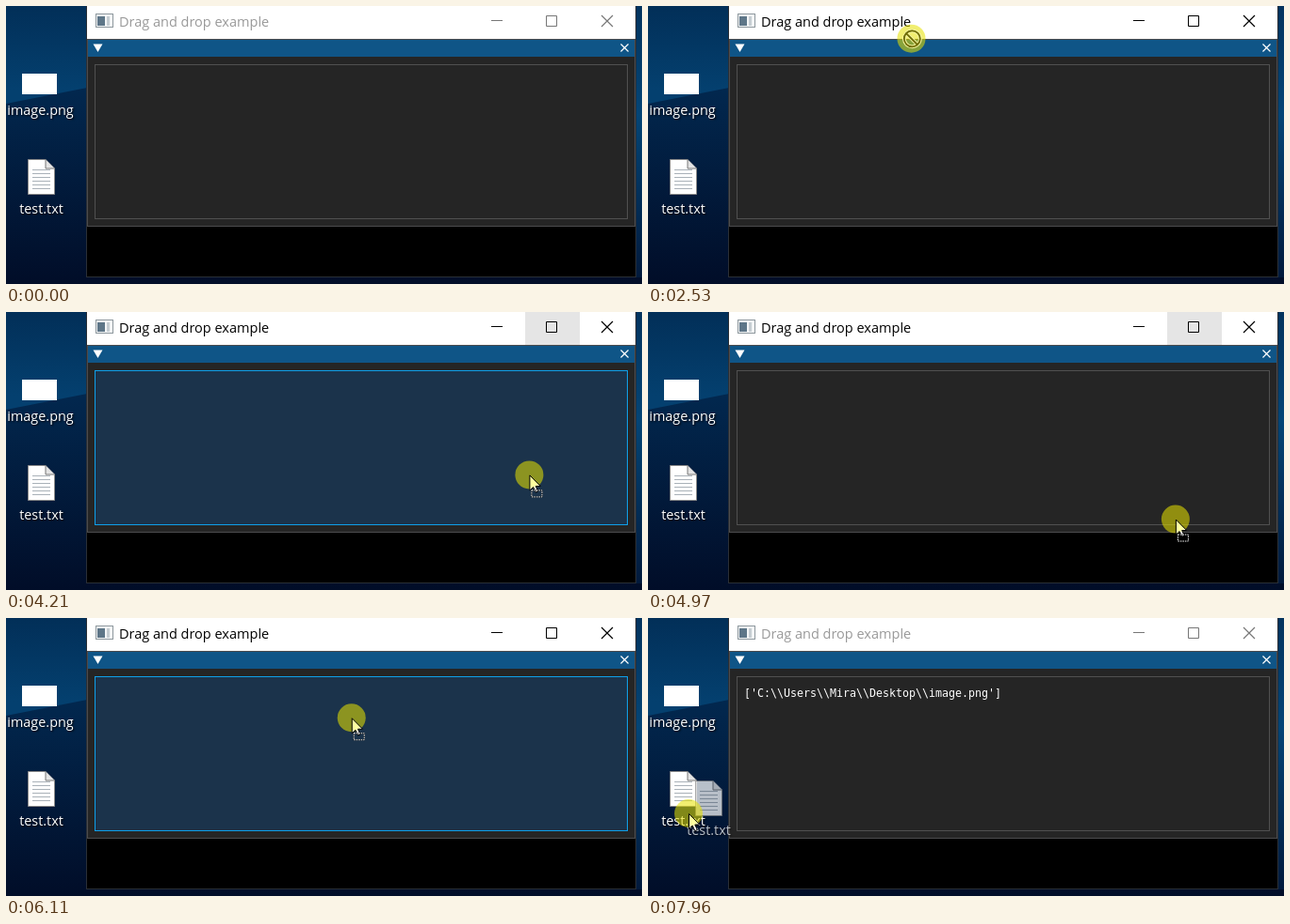
Write an HTML page that moves like this. It is 675 px wide and 296 px high and loops after 8 s.

```html
<!DOCTYPE html>
<html lang="en">
<head>
<meta charset="utf-8">
<title>Drag and drop</title>
<style>
  html, body { margin: 0; width: 100%; height: 100%; overflow: hidden; background: #010d28; }
  svg { display: block; width: 675px; height: 296px; }
  text { font: 14.4px "Open Sans", "Noto Sans", sans-serif; white-space: pre; }
  .label { fill: #fff; text-anchor: middle; text-shadow: 1px 1px 2px #000; }
  .title { font-size: 14.5px; fill: currentColor; }
  .mono { font: 11.63px "DejaVu Sans Mono", monospace; fill: #fff; }
  .line { fill: none; stroke: currentColor; }
  #bar { color: #000; }
  #bar.idle { color: #999; }
  #bar.idle .line { color: #777; }
  #panel { fill: #252525; stroke: #505050; }
  #panel.hot { fill: #1b334b; stroke: #0fa0ea; }
  #tile { fill: #78b4e6; fill-opacity: .22; stroke: #8cc3ee; stroke-opacity: .4; }
  .arrow { fill: #fff; stroke: #000; stroke-linejoin: round; }
  .pressed .arrow { fill: url(#tint); }
</style>
</head>
<body>
<svg viewBox="0 0 675 296">
  <defs>
    <linearGradient id="sky" x2="0" y2="1">
      <stop offset="0" stop-color="#022f58"/>
      <stop offset=".3" stop-color="#04406f"/>
    </linearGradient>
    <linearGradient id="shade" x2="0" y2="1">
      <stop offset="0" stop-color="#02284f"/>
      <stop offset="1" stop-color="#010d28"/>
    </linearGradient>
    <linearGradient id="edge" x2="0" y2="1">
      <stop offset="0" stop-color="#03335e"/>
      <stop offset=".4" stop-color="#044576"/>
      <stop offset="1" stop-color="#021a3c"/>
    </linearGradient>
    <radialGradient id="tint" gradientUnits="userSpaceOnUse" cx="0" cy="0" r="16">
      <stop offset=".8" stop-color="#ffffa0"/>
      <stop offset="1" stop-color="#fff"/>
    </radialGradient>
    <path id="cross" d="M-6 -6L6 6M6 -6L-6 6"/>
    <path id="sign" d="M-6 -6L6 6A8.500 8.500 0 1 0 -6 -6A8.500 8.500 0 0 0 6 6"/>
    <g id="png">
      <rect x="17" y="72" width="37" height="22" fill="#fff"/>
      <text class="label" x="36.500" y="116">image.png</text>
    </g>
    <g id="txt">
      <path d="M23.500 163.500H42L51.500 173V200.500H23.500Z" fill="#fff" stroke="#8a8a8a"/>
      <path d="M42 163.500V173H51.500" fill="#e4e4e4" stroke="#777"/>
      <path d="M37.500 174V196" stroke="#a9b1b8" stroke-width="19" stroke-dasharray="1 3"/>
      <text class="label" x="37.500" y="221">test.txt</text>
    </g>
  </defs>

  <rect width="675" height="296" fill="url(#sky)"/>
  <path d="M0 104L86 87V289H675V296H0Z" fill="url(#shade)"/>
  <rect x="668" width="7" height="289" fill="url(#edge)"/>
  <rect id="tile" x=".5" width="73" height="71"/>
  <use href="#png"/>
  <use href="#txt"/>

  <rect x="85.500" y="-1" width="583" height="289.500" stroke="#2a2f36"/>
  <g id="bar">
    <rect x="86" width="582" height="35" fill="#fff"/>
    <rect id="button" x="551" width="58" height="35" fill="#e5e5e5"/>
    <rect x="95.500" y="8.500" width="18" height="14" fill="#f4f6f7" stroke="#8d979d"/>
    <rect x="97" y="11" width="8" height="10" fill="#5e7688"/>
    <rect x="107" y="11" width="3" height="10" fill="#c6cdd2"/>
    <text class="title" x="120" y="22">Drag and drop example</text>
    <path class="line" d="M515 15.500H527M573.500 10.500H584.500V21.500H573.500Z"/>
    <use class="line" href="#cross" x="638" y="16" stroke-width="1.200"/>
  </g>
  <rect x="86.500" y="35.500" width="581" height="199" fill="#252525" stroke="#4b4b4d"/>
  <rect x="87" y="36" width="580" height="18" fill="#0f5587"/>
  <path d="M92.500 40.500H102.500L97.500 49Z" fill="#fff"/>
  <use href="#cross" transform="translate(656.500 44.500) scale(.67)" stroke="#fff" stroke-width="1.800"/>
  <rect id="panel" x="94.500" y="62.500" width="565" height="164"/>
  <text id="result" class="mono" x="102" y="84">['C:\\Users\\Mira\\Desktop\\image.png']</text>

  <use id="pngGhost" href="#png" opacity=".7"/>
  <use id="txtGhost" href="#txt" opacity=".72"/>
  <g id="pointer">
    <circle id="spot" r="15" fill="#e6e000" fill-opacity=".56"/>
    <g id="arrow">
      <path class="arrow" d="M.5 .5V16.500L4.200 13L6.800 18.700L9.300 17.600L6.800 12H11.800Z"/>
      <g id="box" fill="none">
        <rect x="2.500" y="16.500" width="11" height="7" stroke="#000"/>
        <rect x="2.500" y="16.500" width="11" height="7" stroke="#fff" stroke-dasharray="1.500 1"/>
      </g>
    </g>
    <g id="deny" fill="none" transform="translate(.5 .5)">
      <use href="#sign" stroke="#f3f2a0" stroke-width="3.800"/>
      <use href="#sign" stroke="#6f6c00" stroke-width="1.800"/>
    </g>
  </g>
</svg>
<script>
const LOOP = 8000;
const ENTER = 70, PRESS = 1120, DRAG = 1280, DROP = 6580, PRESS2 = 7530;
const DOOR = [456, 276], GRAB = [56, 84], GRAB2 = [16, 198];

const out = u => Math.sin(u * Math.PI / 2);
const smooth = u => u * u * (3 - 2 * u);

// Each move bends towards an optional point; the pointer rests in between
const moves = [
  { from: ENTER, until: 310, to: GRAB, ease: out },
  { from: DRAG, until: 1520, to: [180, 122], ease: out },
  { from: 1970, until: 3120, to: [585, 34], bend: [191, -12], ease: smooth },
  { from: 3360, until: 3580, to: [555, 118], bend: [581, 64], ease: out },
  { from: 3910, until: 4610, to: [556, 258], ease: smooth },
  { from: 4890, until: 5660, to: [486, 31], bend: [577, 144], ease: out },
  { from: 5710, until: 6430, to: [315, 140], bend: [434, 62], ease: out },
  { from: 6750, until: 7200, to: GRAB2, ease: smooth },
  { from: PRESS2, until: 7960, to: [43, 208], ease: out }
];

const el = id => document.getElementById(id);
const show = (id, on) => { el(id).style.display = on ? "" : "none"; };
const move = (id, x, y) => el(id).setAttribute("transform", `translate(${x} ${y})`);
const within = (t, a, b) => t >= a && t < b;

function pos(t) {
  let p = DOOR;
  for (const { from, until, to, bend, ease } of moves) {
    if (t < from) break;
    const s = ease(Math.min(1, (t - from) / (until - from))), r = 1 - s;
    p = p.map((a, k) => {
      const mid = bend ? bend[k] : (a + to[k]) / 2;
      return r * r * a + 2 * r * s * mid + s * s * to[k];
    });
  }
  return p;
}

function overPanel(t) {
  const [x, y] = pos(t);
  return within(t, DRAG, DROP) && within(x, 94, 660) && within(y, 64, 227);
}

function draw(t) {
  const [x, y] = pos(t);
  const dragging = within(t, DRAG, DROP), dragging2 = t >= PRESS2 + 50;
  const held = within(t, PRESS, DROP) || t >= PRESS2;
  const over = overPanel(t);
  const denied = dragging && !over && x >= 86;

  show("pointer", t >= ENTER);
  move("pointer", x, y);
  el("pointer").classList.toggle("pressed", held);
  show("spot", held);
  show("arrow", !denied);
  show("box", over);
  show("deny", denied);

  const onTxt = t > DROP && x < 74;
  show("tile", !held && t >= ENTER && x < 74);
  el("tile").setAttribute("y", onTxt ? 160.5 : 55.5);

  show("pngGhost", dragging && x < 94);
  move("pngGhost", x - GRAB[0], y - GRAB[1]);
  show("txtGhost", dragging2);
  move("txtGhost", x - GRAB2[0], y - GRAB2[1]);

  el("bar").classList.toggle("idle", !within(t, DRAG + 40, PRESS2));
  show("button", within(t, 3050, 5450));
  el("panel").classList.toggle("hot", over && overPanel(t - 50));
  show("result", t >= DROP);
}

const start = performance.now();
function tick() {
  draw((performance.now() - start) % LOOP);
  requestAnimationFrame(tick);
}
tick();
</script>
</body>
</html>
```
